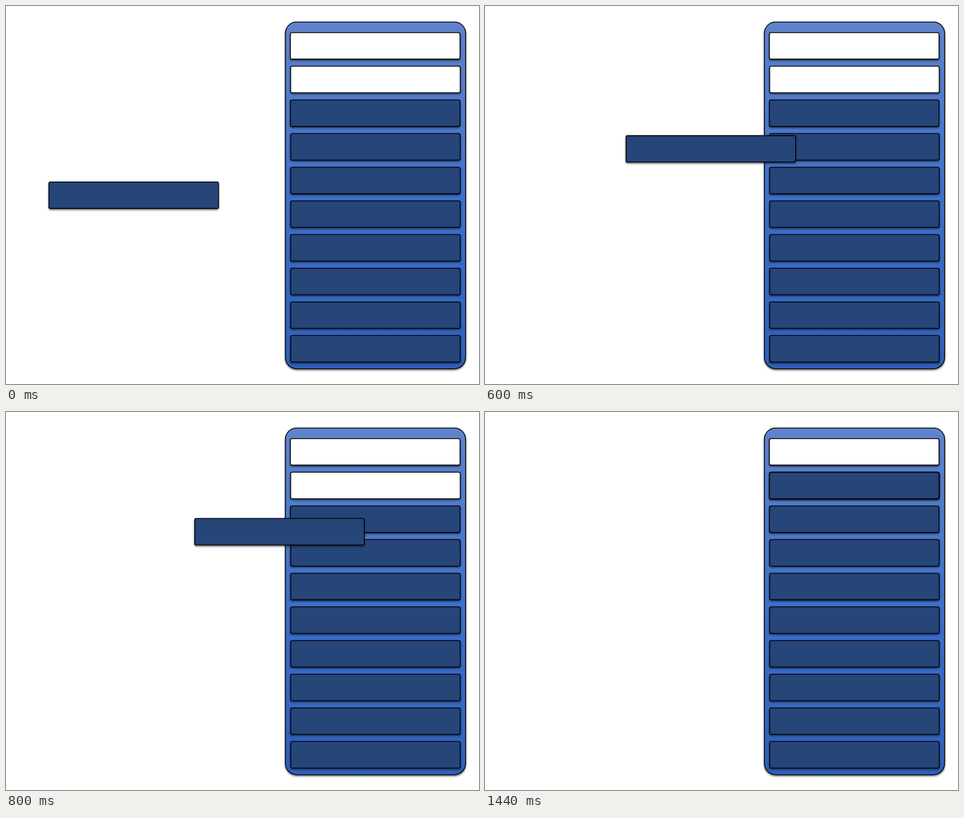
These frames come from a looping animation (756 by 605 pixels, 1.6 s). An HTML page:

```html
<!DOCTYPE html>
<html lang="en">
<head>
<meta charset="utf-8">
<title>Push onto a stack</title>
<style>
  html, body { margin: 0; width: 100%; height: 100%; overflow: hidden; background: #fff; }
  svg { display: block; width: 756px; height: 605px; }
  rect { stroke: #000; stroke-width: 1.3; }
</style>
</head>
<body>
<svg id="stage" viewBox="0 0 756 605">
  <defs>
    <linearGradient id="panelFill" x1="0" y1="0" x2="0" y2="1">
      <stop offset="0" stop-color="#6083cb"/>
      <stop offset=".5" stop-color="#3e70ca"/>
      <stop offset="1" stop-color="#2e61ba"/>
    </linearGradient>
    <filter id="shadow" filterUnits="userSpaceOnUse" x="0" y="0" width="756" height="605">
      <feDropShadow dx="0" dy="1.6" stdDeviation="1.6" flood-color="#000" flood-opacity=".63"/>
    </filter>
  </defs>
</svg>
<script>
const stage = document.getElementById('stage');
const NAVY = '#264478';
const SLOTS = 10, EMPTY = 2, SLOT_TOP = 42.6, SLOT_PITCH = 53.87;

// Each stop of the incoming block: start time, left, top.
const STOPS = [
  [0, 68.6, 281.6],
  [400, 148.6, 244.6],
  [600, 225.5, 207.5],
  [800, 301.6, 170.4],
  [1000, 378.5, 133.4],
  [1200, 454.6, 96.5]
];
const LOOP = 1600;

function addBox(x, y, width, height, rx, fill) {
  const group = document.createElementNS(stage.namespaceURI, 'g');
  const box = document.createElementNS(stage.namespaceURI, 'rect');
  for (const [key, value] of Object.entries({ x, y, width, height, rx, fill })) {
    box.setAttribute(key, value);
  }
  group.setAttribute('filter', 'url(#shadow)');
  group.append(box);
  stage.append(group);
  return box;
}

const addBlock = (x, y, fill) => addBox(x, y, 271, 42.4, 2.5, fill);

addBox(446.6, 25.6, 288, 555, 18, 'url(#panelFill)');
for (let i = 0; i < SLOTS; i++) {
  const left = i === 0 || i === EMPTY ? 454.6 : 455;
  addBlock(left, SLOT_TOP + i * SLOT_PITCH, i < EMPTY ? '#fff' : NAVY);
}
const incoming = addBlock(STOPS[0][1], STOPS[0][2], NAVY);

function render(time) {
  const [, x, y] = STOPS.findLast(([start]) => start <= time);
  incoming.setAttribute('x', x);
  incoming.setAttribute('y', y);
}

const origin = performance.now();
function tick() {
  render((performance.now() - origin) % LOOP);
  requestAnimationFrame(tick);
}
tick();
</script>
</body>
</html>
```
